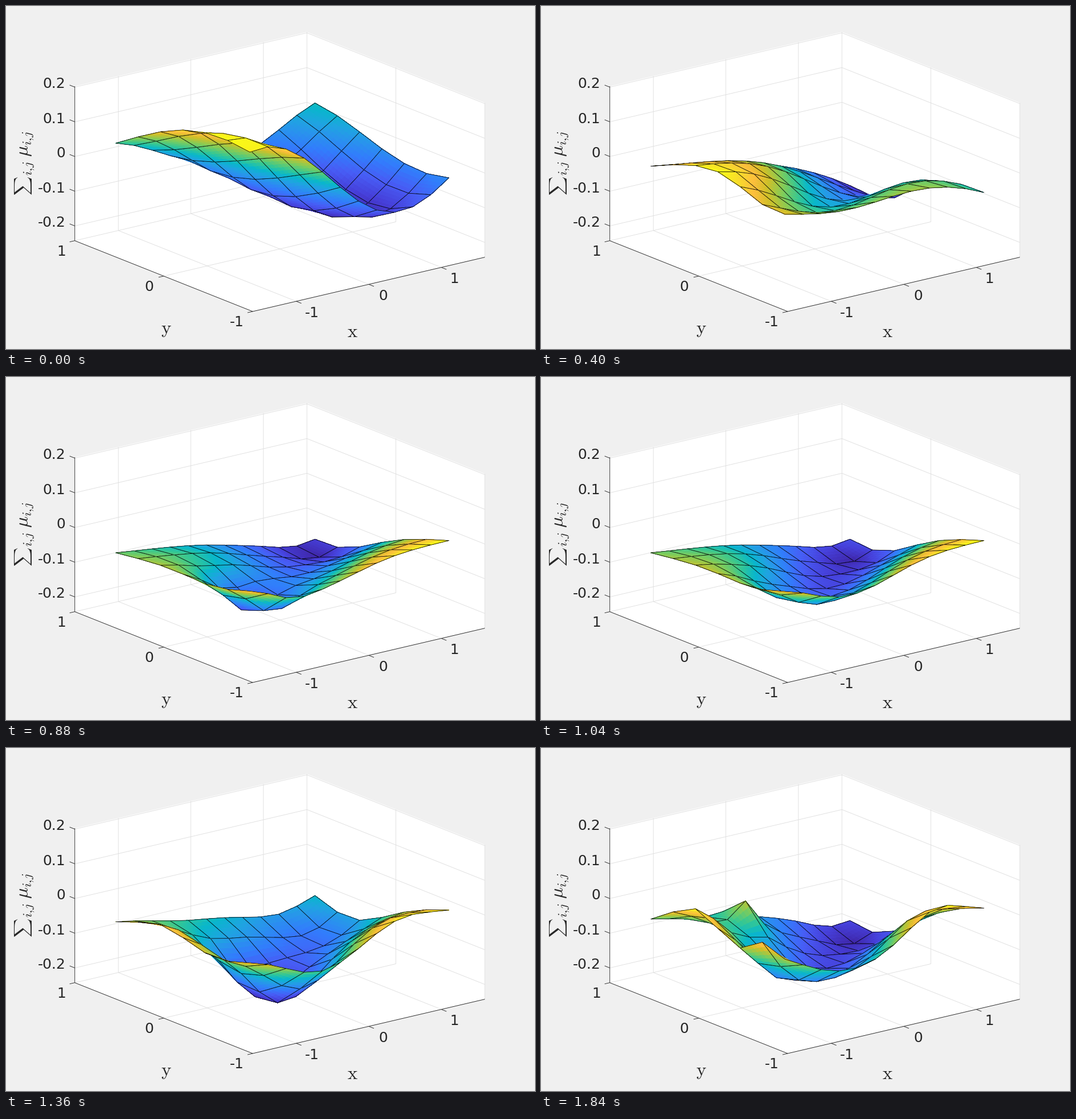
Recreate the animation shown at these times as a matplotlib script. Size 929x603 px, loop 1.88 s.

```python
import numpy as np
import matplotlib.pyplot as plt
from matplotlib.animation import FuncAnimation
from matplotlib.collections import LineCollection, PolyCollection
from matplotlib.colors import LinearSegmentedColormap

W, H, DPI = 929, 603, 64
PT = 72 / DPI                      # points per pixel
STEP, FRAMES = 40, 47
NX, NY, SUB = 12, 7, 6             # surface nodes and shading subdivisions
XLIM, YLIM, ZLIM = (-1.6, 1.6), (-1, 1), (-0.2426, 0.2025)
INK = "#262626"

# Moments at which the sheet takes a new shape
CHANGES = [0, 120, 280, 400, 520, 640, 760, 880,
           1040, 1160, 1360, 1480, 1600, 1760, 1840]

# Passing bumps: time, span, i, k, height, width
PULSES = [(120, 160, 11, 0, 118, 3),
          (640, 240, 3, 6, -45, 2),
          (880, 240, 2.3, 4.2, -85, 1.6),
          (1360, 200, 4, 3, -100, 2),
          (1360, 200, 11, 0, 55, 2),
          (1720, 300, 2, 4, -70, 1.5),
          (1840, 240, 4, 1, 72, 0.8),
          (1840, 240, 0, 5, 58, 0.8)]

CMAP = LinearSegmentedColormap.from_list("surface", [
    (0, "#3e26a8"), (0.1, "#4640da"), (0.2, "#475df5"), (0.3, "#327cfc"),
    (0.4, "#2797ea"), (0.45, "#1ea5e0"), (0.52, "#08b7cb"), (0.6, "#33c795"),
    (0.7, "#81cc59"), (0.8, "#d1bf27"), (0.87, "#fdbe3d"), (0.93, "#f8d82d"),
    (1, "#f9fb15")])

I, K = np.meshgrid(np.arange(NX), np.arange(NY))
U, V = I / (NX - 1), K / (NY - 1)  # V runs from the back to the front


def project(x, y, z):
    u, v, w = x - XLIM[0], y - YLIM[0], z - ZLIM[0]
    return np.stack([433.2 + 127.4 * u - 156.2 * v,
                     537 - 29.8 * u - 62.2 * v - 610 * w], axis=-1)


def bump(i, k, width):
    return np.exp(-((I - i) ** 2 + (K - k) ** 2) / width ** 2)


def ease(t, start, end):
    p = np.clip((t - start) / (end - start), 0, 1)
    return p * p * (3 - 2 * p)


# Heights below are in thousandths
def crest():
    """High wave along the left edge with a trough behind it."""
    swell = 75 * np.sin(0.75 * np.pi * V)
    wave = np.cos(2 * np.pi * (I + 1 - 2 * V) / 14)
    return 80 * V + (57 + swell) * wave - (32 + swell) * U


def trough():
    """Slanting trough that has run on to the back corner."""
    valley = np.exp(-((I - 6.8 - 3.6 * np.cos(np.pi * V)) / 4) ** 2)
    plane = 45 * V - 15 - 90 * U * (1 - V) - 100 * U ** 3
    return (plane + 45 * np.sin(np.pi * V)
            - 125 * np.sin(0.85 * np.pi * V) * valley)


def bowl(t):
    """Sagging sheet; late in the loop hills rise on its rim."""
    depth = np.interp(t, [640, 880, 1160], [75, 50, 112])
    center = 6.2 + 2.3 * np.cos(np.pi * V)
    width = 3 + 0.9 * np.sin(np.pi * V)
    valley = np.exp(-((I - center) / width) ** 2)
    z = -(1 - V) * (60 + 70 * U) - 5 * V - 30 * bump(10, 1, 1.5)
    z = z - (25 + depth * np.sin(0.85 * np.pi * V)) * valley
    hills = 80 * bump(0, 2, 1.5) + 50 * bump(8.5, 6, 2) - 30 * bump(11, 0, 3)
    return z + hills * ease(t, 1160, 1600)


def heights(ms):
    t = max(c for c in CHANGES if c <= ms)
    if t < 400:
        z = crest() + (trough() - crest()) * t / 400
    else:
        z = trough() + (bowl(t) - trough()) * min(1, (t - 400) / 240)
    for time, span, i, k, height, width in PULSES:
        z = z + height * max(0, 1 - abs(t - time) / span) * bump(i, k, width)
    return z / 1000


def linear_weights(n):
    fine = np.linspace(0, n - 1, (n - 1) * SUB + 1)
    return np.maximum(0, 1 - np.abs(fine[:, None] - np.arange(n)))


I_FINE, K_FINE = linear_weights(NX), linear_weights(NY)


def quads(a):
    """Corner values of every cell of a grid."""
    return np.stack([a[:-1, :-1], a[:-1, 1:], a[1:, 1:], a[1:, :-1]], axis=2)


def surface(z):
    nodes = project(-1.341 + 0.2496 * I, 0.75 - 0.2511 * K, z)
    outline = quads(nodes)
    patch = quads(np.einsum("ak,kic,bi->abc", K_FINE, nodes, I_FINE))
    level = quads(K_FINE @ z @ I_FINE.T).mean(axis=2)
    color = CMAP((level - z.min()) / (z.max() - z.min()))
    verts, faces = [], []
    for k in range(NY - 1):                    # far cells first
        for i in range(NX - 2, -1, -1):
            cell = (slice(k * SUB, (k + 1) * SUB),
                    slice(i * SUB, (i + 1) * SUB))
            verts += [patch[cell][:, ::-1].reshape(-1, 4, 2), outline[k, i][None]]
            faces += [color[cell][:, ::-1].reshape(-1, 4), np.zeros((1, 4))]
    return np.concatenate(verts), np.concatenate(faces)


plt.rcParams["font.family"] = "DejaVu Sans"
plt.rcParams["mathtext.fontset"] = "cm"
fig = plt.figure(figsize=(W / DPI, H / DPI), dpi=DPI, facecolor="#f0f0f0")
ax = fig.add_axes([0, 0, 1, 1])
ax.set_xlim(0, W)
ax.set_ylim(H, 0)
ax.axis("off")

(x0, x1), (y0, y1), (z0, z1) = XLIM, YLIM, ZLIM


def add_lines(paths, color, order):
    paths = [[project(*p) for p in path] for path in paths]
    ax.add_collection(LineCollection(paths, colors=color, linewidths=PT * 0.9,
                                     zorder=order))


def label(x, y, text, size=25, **kw):
    kw = {"ha": "center", "va": "center", **kw}
    ax.text(x, y, text, fontsize=size * PT, color=INK, **kw)


box = [(x0, y1, z1), (x1, y1, z1), (x1, y0, z1),
       (x1, y0, z0), (x0, y0, z0), (x0, y1, z0)]
ax.fill(*np.array([project(*p) for p in box]).T, color="white", lw=0, zorder=0)

z_ticks = [-0.2, -0.1, 0, 0.1, 0.2]
ticks = [-1, 0, 1]
grid = [[(x0, y1, z), (x1, y1, z), (x1, y0, z)] for z in z_ticks]
grid += [[(x, y0, z0), (x, y1, z0), (x, y1, z1)] for x in ticks]
grid += [[(x0, y, z0), (x1, y, z0), (x1, y, z1)] for y in ticks]
add_lines(grid, "#dfdfdf", 1)

axes = [[(x0, y1, z1), (x0, y1, z0), (x0, y0, z0), (x1, y0, z0)]]
axes += [[(x0, y1, z), (x0, y1 + 0.058, z)] for z in z_ticks]
axes += [[(x, y0, z0), (x, y0 - 0.058, z0)] for x in ticks]
axes += [[(x0, y, z0), (x0 - 0.071, y, z0)] for y in ticks]
add_lines(axes, INK, 2)

for z in z_ticks:
    label(104.5, 259.5 - 610 * z, f"{z:g}", ha="right")
for n in ticks:
    label(662 + 125 * n, 510 - 29.7 * n, str(n))
    label(251 - 154 * n, 494 - 62 * n, str(n))
label(281.5, 568, r"$\mathrm{y}$", 33)
label(608.5, 572, r"$\mathrm{x}$", 33)

upright = dict(ha="left", rotation=90, rotation_mode="anchor")
label(30, 333, r"$\sum$", 23, **upright)
label(39, 265, r"$\mu$", 33, va="baseline", **upright)
for x, y in [(45.5, 298), (44.5, 245)]:
    label(x, y, "$i{,}j$", 23, va="baseline", **upright)

# Shaded patches carry no edge; each cell ends with one outline
is_line = np.tile([False] * SUB ** 2 + [True], (NX - 1) * (NY - 1))
edge = np.zeros((len(is_line), 4))
edge[is_line, 3] = 1
sheet = PolyCollection([], edgecolors=edge, zorder=3,
                       linewidths=np.where(is_line, 0.8 * PT, 0),
                       antialiaseds=is_line)
ax.add_collection(sheet, autolim=False)


def update(frame):
    verts, faces = surface(heights(frame * STEP))
    sheet.set_verts(verts)
    sheet.set_facecolor(faces)
    return [sheet]


anim = FuncAnimation(fig, update, frames=FRAMES, interval=STEP, repeat=True,
                     repeat_delay=0, init_func=lambda: update(0))
plt.show()
```
